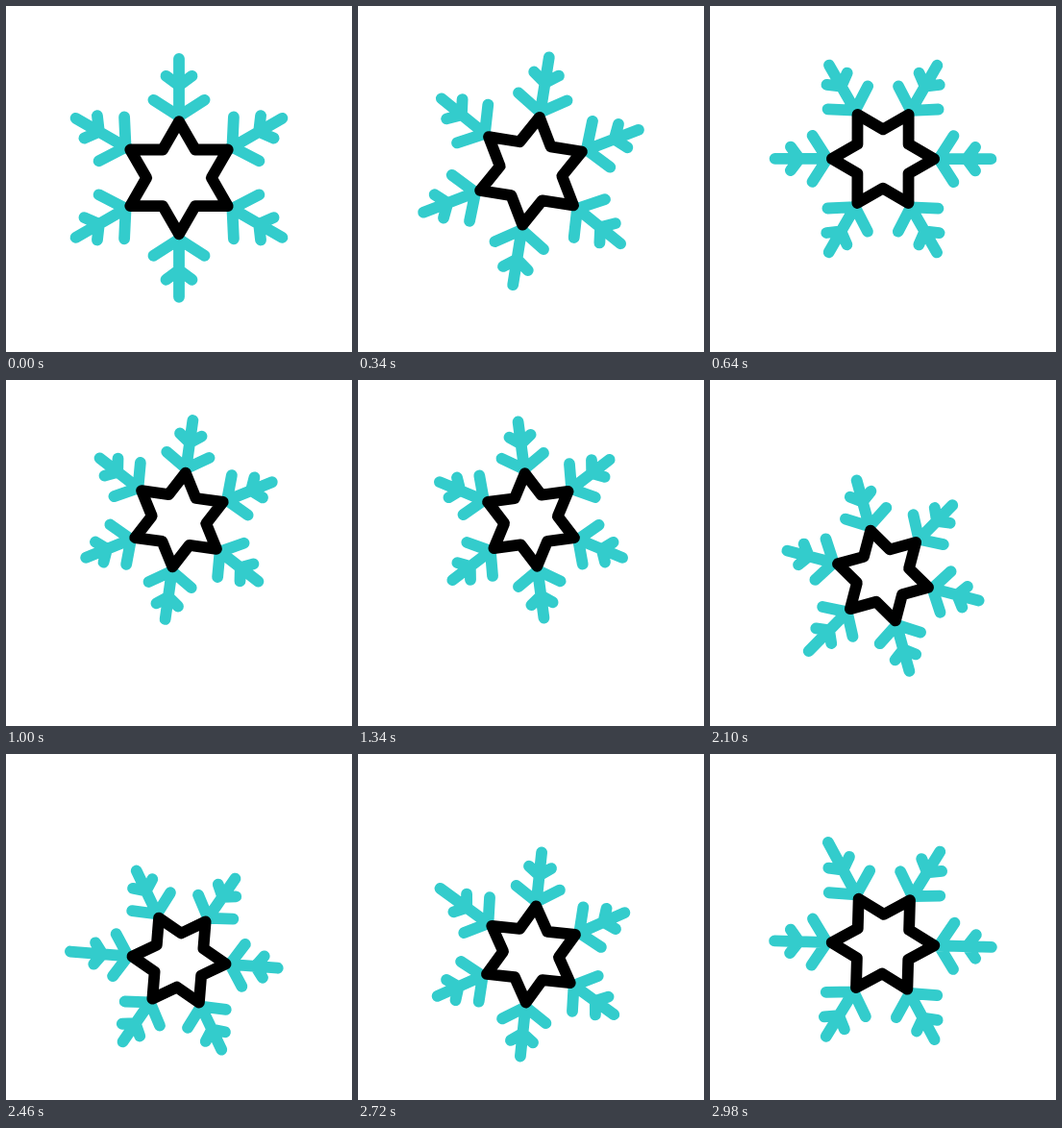
These frames come from a looping animation (360x360 px, 3000 ms). An HTML page:

```html
<!DOCTYPE html>
<html lang="en">
<head>
<meta charset="utf-8">
<title>Snowflake</title>
<style>
  html, body { margin: 0; width: 100%; height: 100%; overflow: hidden; background: #fff; }
  svg { display: block; width: 100vw; height: 100vh; }
</style>
</head>
<body>
<svg viewBox="0 0 360 360">
  <g id="flake" fill="none" stroke-linecap="round" stroke-linejoin="round">
    <g id="arms" stroke="#33cccc"></g>
    <path id="star" stroke="#000"/>
  </g>
</svg>
<script>
const LOOP = 3000, STEP = 20;
const TURN = 3600;          // full cycle of the motion; the loop cuts it short
const THIRD = TURN / 3;
const CENTER = { x: 180, y: 178.8 };
const STAR_R = 58.6, ARM_R = 124, LINE = 11.8;

const flake = document.getElementById('flake');
const armGroup = document.getElementById('arms');

const ease = (t, from, to) => {
  const u = Math.min(1, Math.max(0, (t - from) / (to - from)));
  return u * u * (3 - 2 * u);
};

const armPath = tip =>
  `M0-60V${-tip}M-13.5-106L0-96L13.5-106M-26.5-81L0-64L26.5-81`;

const arms = Array.from({ length: 6 }, (_, i) => {
  const arm = document.createElementNS('http://www.w3.org/2000/svg', 'path');
  arm.setAttribute('transform', `rotate(${i * 60})`);
  arm.setAttribute('d', armPath(ARM_R));
  return armGroup.appendChild(arm);
});

const starPoints = Array.from({ length: 12 }, (_, i) => {
  const r = i % 2 ? STAR_R / Math.sqrt(3) : STAR_R;
  const a = i * Math.PI / 6;
  return `${(r * Math.sin(a)).toFixed(2)},${(-r * Math.cos(a)).toFixed(2)}`;
});
document.getElementById('star').setAttribute('d', `M${starPoints.join('L')}Z`);

function draw(t) {
  const angle = 360 * ease(t, 0, TURN);
  const rise = -ease(t, 0, THIRD) + 2 * ease(t, THIRD, 2 * THIRD) - ease(t, 2 * THIRD, TURN);
  const scale = 1 - 0.17 * (ease(t, 0, THIRD) - ease(t, 2 * THIRD, TURN));
  const stretch = 12.7 * (ease(t, 1340, 2550) - ease(t, 2550, TURN));

  flake.setAttribute('transform',
    `translate(${CENTER.x} ${CENTER.y + 36 * rise}) rotate(${angle}) scale(${scale})`);
  flake.setAttribute('stroke-width', LINE / scale);  // lines keep their weight as the flake shrinks
  arms[0].setAttribute('d', armPath(ARM_R + stretch));
}

const start = performance.now();
function tick() {
  const t = (performance.now() - start) % LOOP;
  draw(Math.floor(t / STEP) * STEP);
  requestAnimationFrame(tick);
}
draw(0);
requestAnimationFrame(tick);
</script>
</body>
</html>
```
